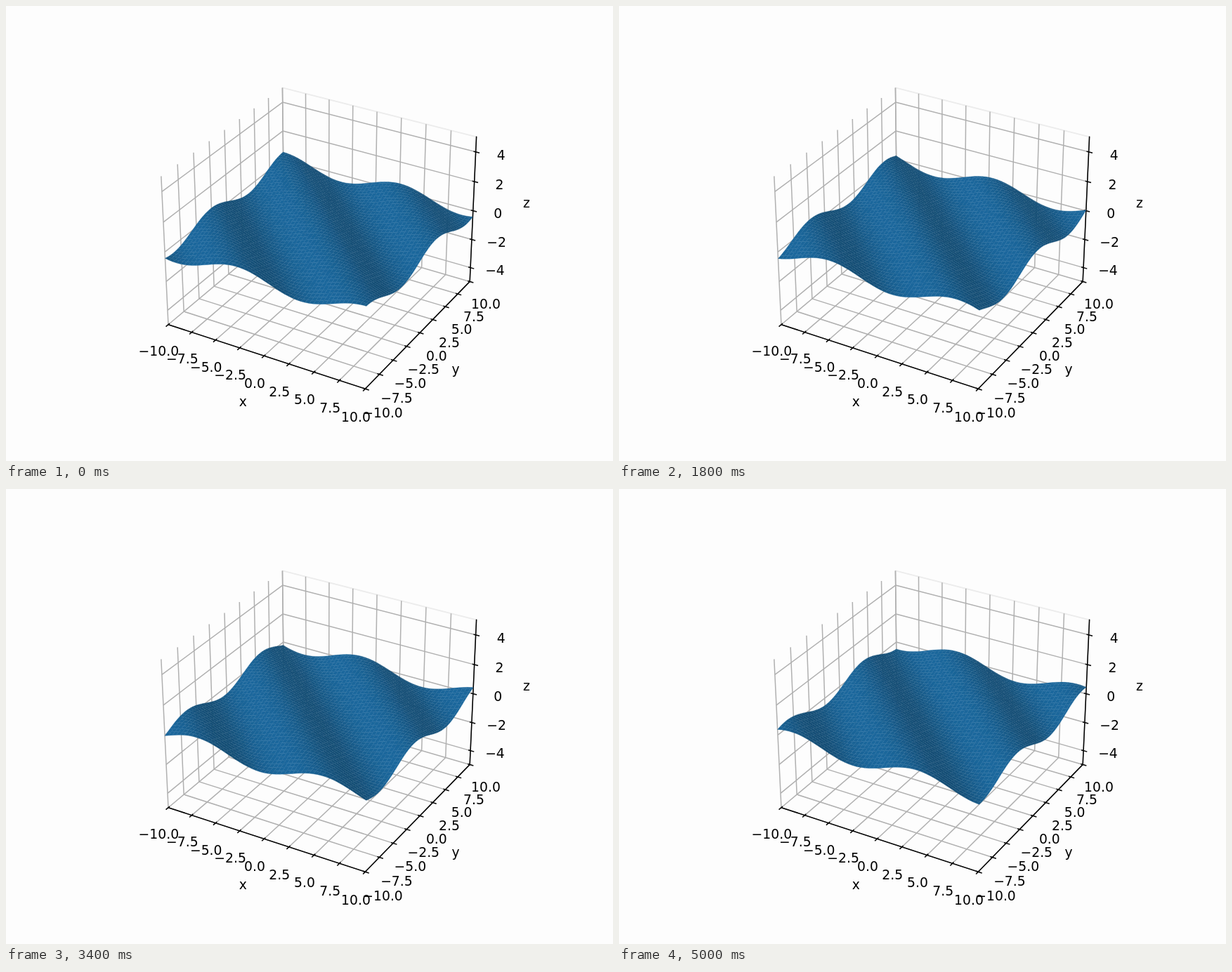
An HTML page with a canvas for the animation above (5.1 s loop, 864 by 648 pixels).

```html
<!DOCTYPE html>
<html lang="en">
<head>
<meta charset="utf-8">
<title>Travelling wave surface</title>
<style>
  html, body { margin: 0; width: 864px; height: 648px; overflow: hidden; background: #fdfdfd; }
  svg, canvas { position: absolute; left: 0; top: 0; display: block; }
  text { font: 18.75px "DejaVu Sans", sans-serif; text-anchor: middle; }
  path { fill: none; stroke-width: 1.5; }
  .grid { stroke: #b0b0b0; stroke-linejoin: round; }
  .axis { stroke: #000; stroke-linecap: square; }
  .edge { stroke: #ececec; }
</style>
</head>
<body>
<svg id="plot" width="864" height="648" viewBox="0 0 864 648"></svg>
<canvas id="surface" width="864" height="648"></canvas>
<script>
const svg = document.getElementById('plot');
const ctx = document.getElementById('surface').getContext('2d');

// Perspective camera: elevation 30, azimuth -60, distance 10, box 4:4:3.
const SIDE = 25 / 21, C30 = Math.sqrt(3) / 2;
function project(x, y, z) {
  const a = x / 20 * SIDE, b = y / 20 * SIDE, c = z / 10 * SIDE * 0.75;
  const right = C30 * a + b / 2;
  const up = -a / 4 + C30 / 2 * b + C30 * c;
  const depth = 10 - (C30 / 2 * a - 0.75 * b + c / 2);
  const k = 2697.08 / depth;
  return [449.54 + right * k, 320.5 - up * k];
}

function add(tag, attrs, text) {
  const el = document.createElementNS('http://www.w3.org/2000/svg', tag);
  for (const name in attrs) el.setAttribute(name, attrs[name]);
  if (text) el.textContent = text;
  svg.appendChild(el);
  return el;
}

function line(cls, ...points) {
  const d = 'M' + points.map(p => project(...p).map(v => v.toFixed(2)).join(' ')).join('L');
  return add('path', { class: cls, d });
}

// Baselines sit on whole pixels.
function label(text, point, drop) {
  const [x, y] = project(...point);
  add('text', { x: (x + 0.5).toFixed(2), y: Math.round(y + drop) }, text);
}

function drawAxes() {
  const wide = Array.from({ length: 9 }, (_, i) => -10 + 2.5 * i);
  const tall = [-4, -2, 0, 2, 4];
  const num = (v, digits) => (v < 0 ? '\u2212' : '') + Math.abs(v).toFixed(digits);

  line('edge', [-10, 10, 5], [10, 10, 5]).style.strokeWidth = 1.875;
  for (const v of wide) line('grid', [v, -10, -5], [v, 10, -5], [v, 10, 5]);
  for (const v of wide) line('grid', [10, v, -5], [-10, v, -5], [-10, v, 5]);
  for (const v of tall) line('grid', [-10, -10, v], [-10, 10, v], [10, 10, v]);

  line('axis', [-10, -10, -5], [10, -10, -5]);
  line('axis', [10, -10, -5], [10, 10, -5]);
  line('axis', [10, 10, -5], [10, 10, 5]);

  const far = 11.66, low = -5.83, drop = 15.2;
  for (const v of wide) {
    line('axis', [v, -9.84, -5], [v, -10.32, -5]);
    label(num(v, 1), [v, -far, low], drop);
    line('axis', [9.84, v, -5], [10.32, v, -5]);
    label(num(v, 1), [far, v, low], drop);
  }
  for (const v of tall) {
    line('axis', [9.84, 10, v], [10.32, 10, v]);
    label(num(v, 0), [far, far, v], drop);
  }
  label('x', [0, -13.608, -6.804], 5.9);
  label('y', [13.608, 0, -6.804], 5.9);
  label('z', [13.608, 13.608, 0], 5.9);
}

const CELLS = 50;
const knots = Array.from({ length: CELLS + 1 }, (_, i) => Math.min(2 * i, 99) * 20 / 99 - 10);
const phase = (x, y, t) => 0.5 * (x + y) + 0.6 * t;

// Diffuse light along (-2, -2, 1) / 3 on a plane with equal x and y slope.
function shade(slope) {
  const lit = (4 * slope + 1) / 3 / Math.hypot(slope, slope, 1);
  const k = 0.3 + 0.35 * (lit + 1);
  return `rgb(${[31, 119, 180].map(c => Math.round(c * k))})`;
}

function drawSurface(t) {
  const pts = knots.map(y => knots.map(x => project(x, y, 0.5 * Math.cos(phase(x, y, t)))));
  ctx.clearRect(0, 0, 864, 648);
  ctx.lineWidth = 0.3; // softens the seams between cells
  for (let j = CELLS - 1; j >= 0; j--) {
    for (let i = 0; i < CELLS; i++) {
      const x = (knots[i] + knots[i + 1]) / 2, y = (knots[j] + knots[j + 1]) / 2;
      ctx.fillStyle = ctx.strokeStyle = shade(-0.25 * Math.sin(phase(x, y, t)));
      ctx.beginPath();
      ctx.moveTo(...pts[j][i]);
      ctx.lineTo(...pts[j][i + 1]);
      ctx.lineTo(...pts[j + 1][i + 1]);
      ctx.lineTo(...pts[j + 1][i]);
      ctx.closePath();
      ctx.fill();
      ctx.stroke();
    }
  }
}

const LOOP = 5100, STEP = 100;
let start = null, shown = 0;
function tick(now) {
  if (start === null) start = now;
  const step = Math.floor((now - start) % LOOP / STEP);
  if (step !== shown) {
    shown = step;
    drawSurface(step * STEP / 1000);
  }
  requestAnimationFrame(tick);
}

drawAxes();
drawSurface(0);
requestAnimationFrame(tick);
</script>
</body>
</html>
```
